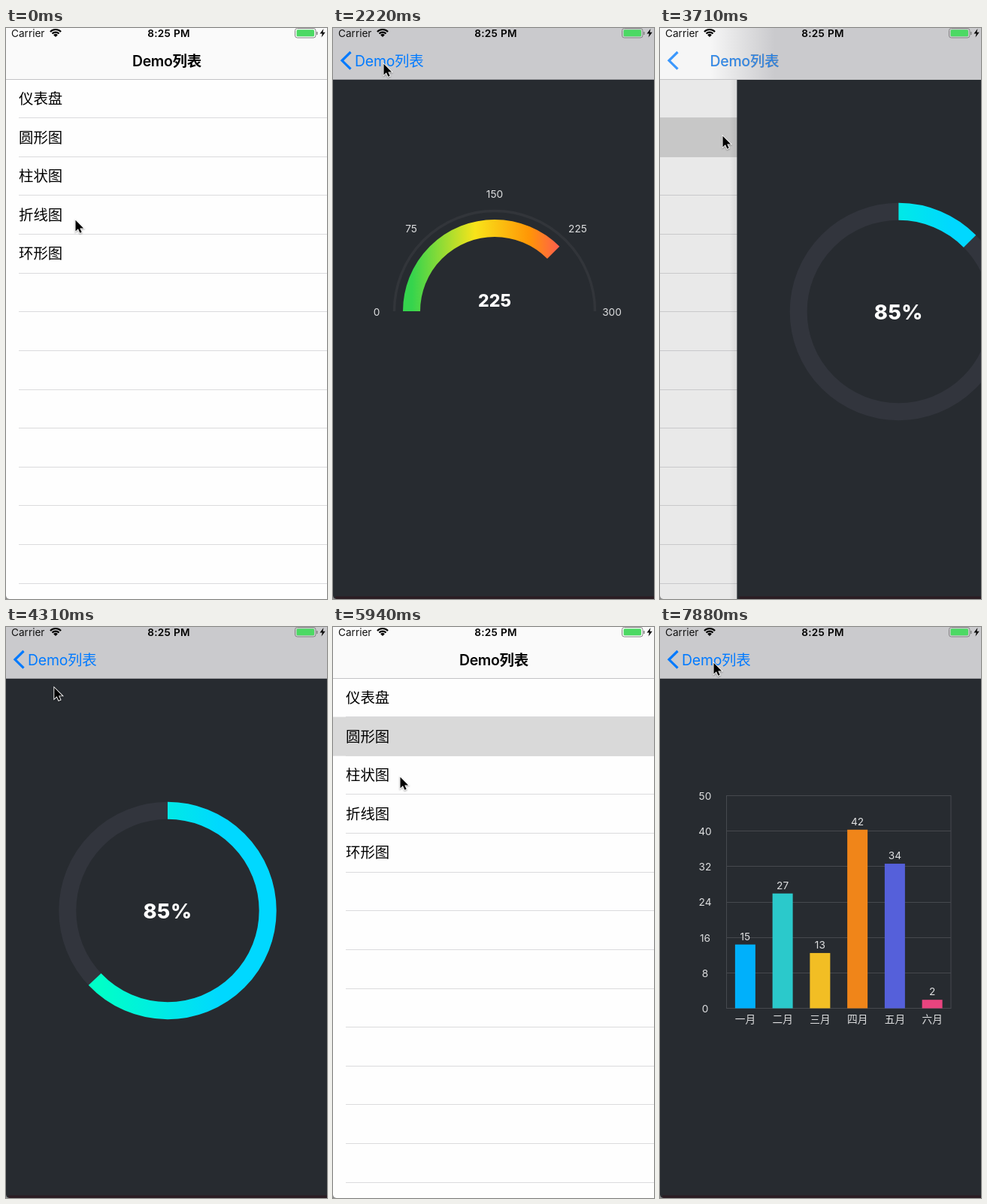
Recreate the animation shown at these times as an HTML page with a canvas. Size 427x760 px, loop 8 s.

```html
<!DOCTYPE html>
<html lang="zh-CN">
<head>
<meta charset="utf-8">
<title>Demo列表</title>
<style>
html, body { margin: 0; width: 100%; height: 100%; overflow: hidden; background: #fff; }
canvas { display: block; }
</style>
</head>
<body>
<canvas id="stage" width="427" height="760"></canvas>
<script>
const ctx = document.getElementById('stage').getContext('2d');
const W = 427, H = 760, NAV = 68, ROW = 51.63, LOOP = 8000, STEP = 148.6;
const BLUE = '#007aff', DARK = '#272b30', PALE = '#dedfe0';
const FONT = 'Inter, "Noto Sans CJK SC", "Noto Sans CJK", sans-serif';
const ROWS = ['仪表盘', '圆形图', '柱状图', '折线图', '环形图'];
const MONTHS = ['一月', '二月', '三月', '四月', '五月', '六月'];
const VALUES = [15, 27, 13, 42, 34, 2];
const BAR_COLORS = ['#00b0fb', '#2bc9cb', '#f2be24', '#f08519', '#5560da', '#e9447f'];

// Navigation: [start tick, pushing, spring phase at that tick]
const MOVES = [[8, true, .6], [18, false, .9], [24, true, .67], [35, false, .9], [42, true, .6]];
// Pointer: [tick, x, y]
const POINTER = [[0, 92, 255], [4, 110, 95], [9, 110, 95], [15, 67, 47], [18, 67, 47], [23, 83, 143],
  [25, 83, 143], [31, 57, 58], [33, 55, 49], [35, 55, 49], [40, 89, 199], [43, 89, 199], [53, 71, 47]];

const clamp = v => Math.min(1, Math.max(0, v));
const lerp = (a, b, k) => a + (b - a) * k;

function text(str, x, y, size, { color = PALE, weight = 400, align = 'center', spacing = 0 } = {}) {
  ctx.font = `${weight} ${size}px ${FONT}`;
  ctx.letterSpacing = spacing + 'px';
  ctx.textAlign = align;
  ctx.fillStyle = color;
  ctx.fillText(str, x, y + size * .364);
}

function rect(x, y, w, h, color) {
  ctx.fillStyle = color;
  ctx.fillRect(x, y, w, h);
}

function gradient(x0, x1, ...stops) {
  const g = ctx.createLinearGradient(x0, 0, x1, 0);
  stops.forEach(([at, color]) => g.addColorStop(at, color));
  return g;
}

function arc(x, y, r, from, to, width, color) {
  ctx.beginPath();
  ctx.arc(x, y, r, from, to);
  ctx.lineWidth = width;
  ctx.strokeStyle = color;
  ctx.stroke();
}

function polygon(points) {
  ctx.beginPath();
  points.forEach(([x, y]) => ctx.lineTo(x, y));
  ctx.closePath();
}

function drawList(p, selected) {
  ctx.save();
  ctx.translate(-.3 * W * p, 0);
  rect(0, NAV, W * 1.3, H, '#fefefe');
  for (let i = 1; i <= 13; i++) rect(17, Math.round(NAV + i * ROW - .5), W * 1.3, 1, '#dbdbdd');
  if (selected >= 0) rect(0, NAV + selected * ROW, W * 1.3, ROW + .4, '#d9d9d9');
  ROWS.forEach((name, i) =>
    text(name, 17, NAV + (i + .5) * ROW, 19.4, { color: '#000', align: 'left' }));
  ctx.restore();
  rect(0, NAV, W, H, `rgba(0,0,0,${.11 * p})`);
}

function drawGauge(k) {
  arc(215, 377, 133.5, Math.PI, 2 * Math.PI, 3.5, '#32353a');
  const color = gradient(105, 300, [0, '#35d44d'], [.43, '#f8e41a'], [.8, '#ff9606'], [1, '#ff5f4c']);
  if (k > 0) arc(215, 377, 110.5, Math.PI, Math.PI * (1 + .75 * k), 23, color);
  [[0, 58, 378], [75, 104, 267], [150, 215, 221.5], [225, 325.5, 267], [300, 371, 378]]
    .forEach(([n, x, y]) => text(n, x, y, 13.7));
  text('225', 215, 363, 23, { color: '#fff', weight: 800 });
}

function drawRing(k) {
  const top = -Math.PI / 2;
  arc(215, 377.5, 133.2, 0, 2 * Math.PI, 23, '#32353d');
  const color = gradient(125, 285, [0, '#00ffc8'], [1, '#00d8ff']);
  if (k > 0) arc(215, 377.5, 133.2, top, top + 2 * Math.PI * .85 * k, 23, color);
  text('85%', 215, 378, 27.3, { color: '#fff', weight: 800, spacing: .5 });
}

function drawBars(k, labelled) {
  const left = 88.5, right = 387, top = 224.5, base = 507.5, gap = (right - left) / 6;
  ctx.lineWidth = 1;
  ctx.strokeStyle = '#46494e';
  ctx.strokeRect(left, top, right - left, base - top);
  [50, 40, 32, 24, 16, 8, 0].forEach((n, i) => {
    const y = top + i * (base - top) / 6;
    rect(left, Math.round(y - .5), right - left, 1, '#46494e');
    text(n, 60, y + .5, 13.7);
  });
  VALUES.forEach((v, i) => {
    const x = left + (i + .5) * gap, h = v / 50 * (base - top) * k;
    rect(x - 13.5, base - h, 27, h, BAR_COLORS[i]);
    text(MONTHS[i], x, 522, 13.7);
    if (labelled) text(v, x, base - h - 11, 13.7);
  });
}

function drawDetail(p, tick) {
  const x = W * (1 - p);
  ctx.save();
  ctx.translate(x, 0);
  rect(0, NAV, W, H, DARK);
  rect(3, 756.5, W, 4, '#2b1d23');
  if (tick < 24) drawGauge(clamp((tick - 8) / 6.75));
  else if (tick < 42) drawRing(clamp((tick - 24) / 6.75));
  else drawBars(clamp((tick - 42) / 6.75), tick >= 49);
  ctx.restore();
}

function drawNav(p, pushing) {
  const x = W * (1 - p), light = '#fafafa', dim = '#cacacd';
  const moving = p > 0 && p < 1;
  rect(0, 0, W, NAV, moving ? gradient(x - 35, x + 50, [0, '#f6f6f6'], [1, dim]) : p ? dim : light);
  rect(0, NAV, W, 1, p === 1 ? '#9b9c9f' : '#c3c3c5');

  const titleX = lerp(168, 29, p ** (pushing ? 1.15 : .7));
  const backAlpha = pushing ? p : p ** 4;
  ctx.globalAlpha = 1 - p;
  text('Demo列表', titleX, 43.5, 19.4, { color: '#000', weight: 600, align: 'left', spacing: -.3 });
  ctx.globalAlpha = backAlpha;
  text('Demo列表', titleX, 43.5, 19.4, { color: BLUE, align: 'left', spacing: -.2 });
  ctx.beginPath();
  ctx.moveTo(23.5, 32);
  ctx.lineTo(12, 43.3);
  ctx.lineTo(23.5, 54.6);
  ctx.lineWidth = 3.2;
  ctx.strokeStyle = BLUE;
  ctx.stroke();
  ctx.globalAlpha = 1;
}

function drawStatus() {
  text('Carrier', 7, 7, 13.6, { color: '#111', align: 'left' });
  text('8:25 PM', 216.5, 7, 13.6, { color: '#000', weight: 600, spacing: .3 });

  const from = -Math.PI * .75, to = -Math.PI * .25;
  arc(66, 12, 10, from, to, 2.2, '#000');
  arc(66, 12, 6.4, from, to, 2.2, '#000');
  arc(66, 12, 2, from, to, 4, '#000');

  ctx.beginPath();
  ctx.roundRect(384.5, .5, 27.5, 12.5, 3);
  ctx.lineWidth = 1;
  ctx.strokeStyle = '#858585';
  ctx.stroke();
  ctx.beginPath();
  ctx.roundRect(386.5, 2.3, 23.5, 9, 1.5);
  ctx.fillStyle = '#4cd964';
  ctx.fill();
  rect(413, 5, 1.5, 4, '#858585');
  polygon([[422.5, 1], [417.5, 7.5], [420.8, 7.5], [419.5, 12.5], [424.7, 5.8], [421.4, 5.8]]);
  ctx.fillStyle = '#000';
  ctx.fill();
}

function drawPointer(tick) {
  const i = Math.max(1, POINTER.findIndex(([at]) => at >= tick));
  const [t0, x0, y0] = POINTER[i - 1], [t1, x1, y1] = POINTER[i];
  const u = clamp((tick - t0) / (t1 - t0)), k = u * u * (3 - 2 * u);
  ctx.save();
  ctx.translate(lerp(x0, x1, k) + .5, lerp(y0, y1, k) + .8);
  polygon([[0, 0], [0, 14.6], [3.4, 11.5], [5.9, 17], [8.2, 16], [5.8, 10.6], [10.6, 10.6]]);
  ctx.shadowColor = 'rgba(0,0,0,.35)';
  ctx.shadowBlur = 2;
  ctx.shadowOffsetY = 1;
  ctx.lineWidth = 1.8;
  ctx.strokeStyle = '#fff';
  ctx.stroke();
  ctx.shadowColor = 'transparent';
  ctx.fillStyle = '#000';
  ctx.fill();
  ctx.restore();
}

function drawCorner() {
  ctx.beginPath();
  ctx.moveTo(0, 755.5);
  ctx.quadraticCurveTo(.5, 759.5, 4.5, 760);
  ctx.lineTo(0, 760);
  ctx.fillStyle = '#8c8c8c';
  ctx.fill();
}

function transition(tick) {
  const move = MOVES.filter(([start]) => start <= tick).pop();
  if (!move) return [0, false];
  const [start, pushing, phase] = move;
  const s = phase + (tick - start) * 2.08;
  const k = s > 6 ? 1 : 1 - (1 + s) * Math.exp(-s);
  return [pushing ? k : 1 - k, pushing];
}

function draw(now) {
  const tick = Math.min(53, Math.floor((now % LOOP + 15) / STEP));
  const [p, pushing] = transition(tick);
  const selected = tick < 8 ? -1 : tick < 24 ? 0 : tick < 42 ? 1 : 2;
  drawList(p, selected);
  if (p > 0) {
    const x = W * (1 - p), alpha = .3 * (pushing ? 1 - p : p);
    rect(x - 10, NAV, 10, H, gradient(x - 10, x, [0, 'rgba(0,0,0,0)'], [1, `rgba(0,0,0,${alpha})`]));
    drawDetail(p, tick);
  }
  drawNav(p, pushing);
  drawStatus();
  drawCorner();
  drawPointer(tick);
}

const begin = performance.now();
(function loop() {
  draw(performance.now() - begin);
  requestAnimationFrame(loop);
})();
</script>
</body>
</html>
```
